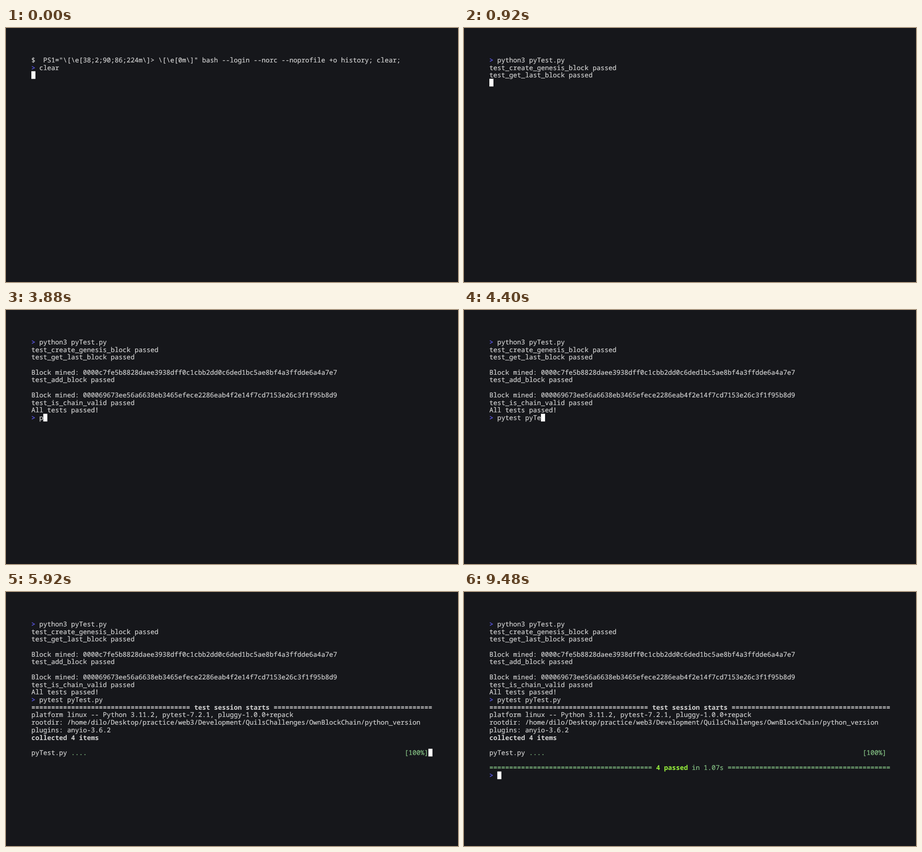
These frames come from a looping animation (998x561 px, 9.56 s). An HTML page:

```html
<!DOCTYPE html>
<html lang="en">
<head>
<meta charset="utf-8">
<title>Terminal</title>
<style>
  html, body { margin: 0; width: 100%; height: 100%; overflow: hidden; background: #16171b; }
  pre, #cursor { position: absolute; left: 56px; }
  pre {
    top: 62.8px; margin: 0; color: #d4d4d4;
    font: 14.61px/16.72px "Noto Sans Mono", "DejaVu Sans Mono", monospace;
    font-variant-ligatures: none; text-rendering: geometricPrecision;
    -webkit-text-stroke: .2px;
  }
  b { -webkit-text-stroke: 0; }
  #cursor { top: 62.4px; width: 8.77px; height: 16.72px; background: #fff; }
  .prompt { color: #5a56e0; -webkit-text-stroke: .5px; }
  .green { color: #87c587; }
  .lime { color: #99f53c; }
</style>
</head>
<body>
<pre id="screen"></pre>
<div id="cursor"></div>
<script>
const LOOP = 9560, CELL = 8.766, LINE = 16.72;
const terminal = document.getElementById("screen");
const cursor = document.getElementById("cursor");

const span = (cls, text) => `<span class="${cls}">${text}</span>`;
const green = text => span("green", text);
const ps1 = span("prompt", "&gt;") + " ";
const rule = n => "=".repeat(n);

const states = []; // [start time, screen markup]
let text = "";
const show = (time, markup) => states.push([time, text = markup]);
const print = (time, more) => show(time, text + more);

// One key about every 51 ms, shown on a 20 ms grid; `late` overrides single keys.
function type(start, command, late = {}) {
  [...command].forEach((key, i) =>
    print(late[i] || Math.floor((start + i * 51.25) / 20) * 20, key));
}

show(0, `$  PS1="\\[\\e[38;2;90;86;224m\\]&gt; \\[\\e[0m\\]" bash --login --norc --noprofile +o history; clear;
${ps1}clear
`);

text = ps1;
type(20, "python3 pyTest.py\n", { 10: 560 });
print(920, "test_create_genesis_block passed\ntest_get_last_block passed\n");
print(940, `
Block mined: 0000c7fe5b8828daee3938dff0c1cbb2dd0c6ded1bc5ae8bf4a3ffdde6a4a7e7
test_add_block passed
`);
print(1120, `
Block mined: 000069673ee56a6638eb3465efece2286eab4f2e14f7cd7153e26c3f1f95b8d9
test_is_chain_valid passed
All tests passed!
`);
print(1160, ps1);

type(3880, "pytest pyTest.py\n");
print(4900, `<b>${rule(40)} test session starts ${rule(40)}</b>
platform linux -- Python 3.11.2, pytest-7.2.1, pluggy-1.0.0+repack
`);
const header = text + `rootdir: /home/dilo/Desktop/practice/web3/Development/QuilsChallenges/OwnBlockChain/python_version
plugins: anyio-3.6.2
`;
show(4920, header + "<b>collecting ... </b>");
show(4940, header + "<b>collected 4 items</b>\n\npyTest.py " + green(".."));
print(5380, green("."));
print(5920, green("." + " ".repeat(80) + "[100%]"));
print(5940, "\n\n" + green(`${rule(41)} <b class="lime">4 passed</b> in 1.07s ${rule(41)}`) + "\n");
print(5960, ps1);

const blinks = [[1740, 2320], [2900, 3500], [6560, 7140], [7720, 8300], [8880, 9480]];
let current;

function draw() {
  const t = performance.now() % LOOP;
  const state = states.findLast(s => s[0] <= t);
  if (state !== current) {
    current = state;
    terminal.innerHTML = state[1];
    const lines = terminal.textContent.split("\n");
    const row = lines.length - 1;
    cursor.style.transform = `translate(${lines[row].length * CELL}px, ${row * LINE}px)`;
  }
  cursor.hidden = blinks.some(([from, to]) => t >= from && t < to);
  requestAnimationFrame(draw);
}
draw();
</script>
</body>
</html>
```
